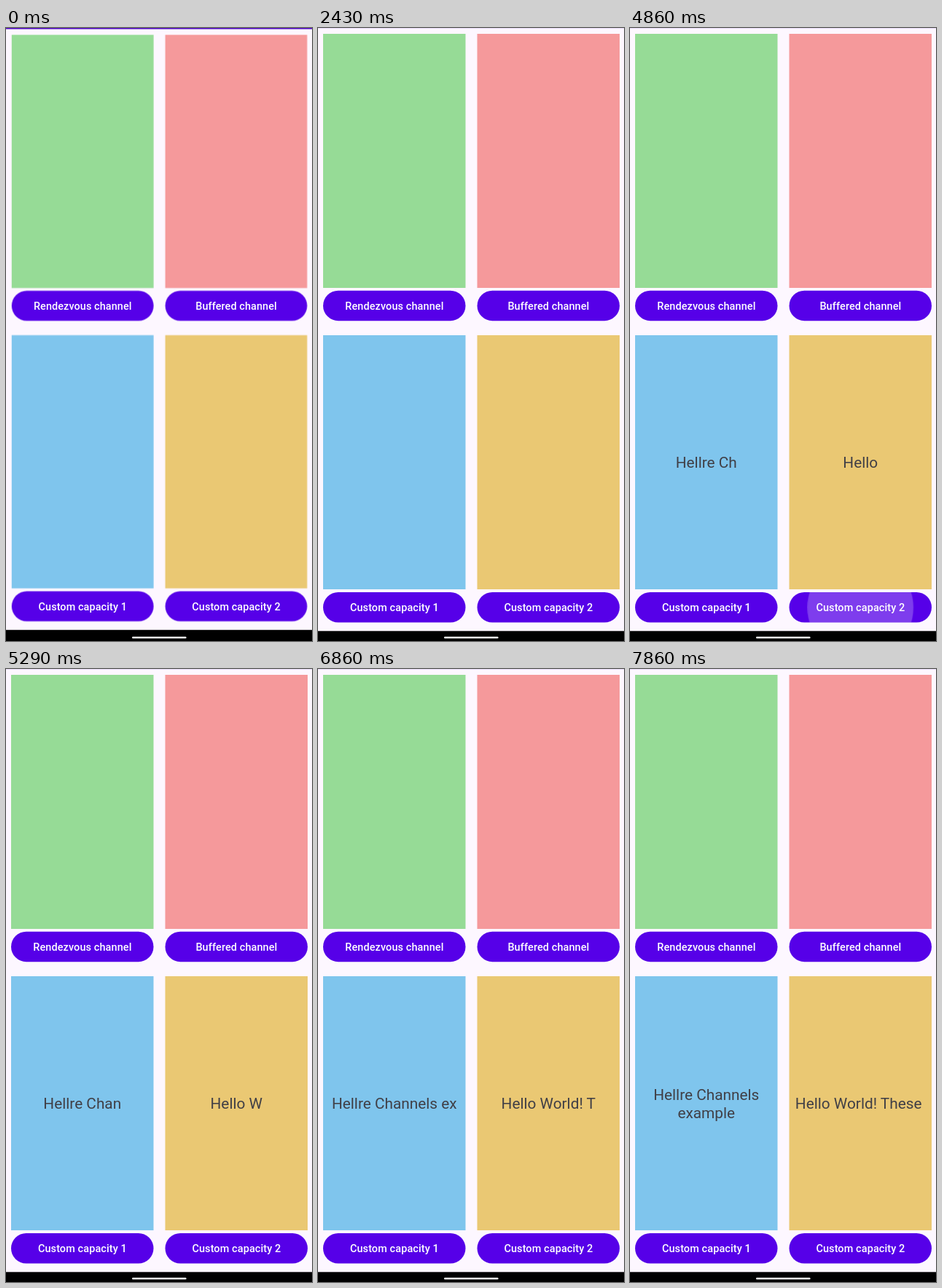
Write an HTML page that moves like this. It is 420x842 px and loops after 8000 ms.

```html
<!DOCTYPE html>
<html lang="en">
<head>
<meta charset="utf-8">
<title>Channels</title>
<style>
  html, body { margin: 0; width: 100%; height: 100%; overflow: hidden; background: #fdf7ff; }
  body { position: relative; }
  svg { position: absolute; left: 0; top: 0; display: block; }
  .label {
    font: 500 14.46px Roboto, sans-serif;
    letter-spacing: .1px;
    fill: #fff;
    text-anchor: middle;
  }
  .button { fill: #5600e8; }
  .screen { transform-origin: 210px 390px; animation: settle 8s linear infinite; }
  .ripple {
    fill: #fff;
    opacity: 0;
    transform-box: fill-box;
    transform-origin: center;
    animation: ripple 8s linear infinite;
  }
  .late { animation-delay: .86s; }
  .message {
    position: absolute;
    top: 422px;
    width: 195px;
    height: 351px;
    display: flex;
    align-items: center;
    justify-content: center;
    text-align: center;
    white-space: pre-wrap;
    font: 400 20.8px/24.8px Roboto, sans-serif;
    color: #403f46;
  }
  @keyframes settle {
    0%, 1.7% { transform: scale(.9965); }
    6.5%, 100% { transform: none; }
  }
  @keyframes ripple {
    0%, 48.1% { opacity: 0; transform: scale(.2); }
    48.9% { opacity: .24; }
    51% { transform: scale(1); }
    51.9% { opacity: .24; }
    54.4%, 100% { opacity: 0; transform: scale(1); }
  }
</style>
</head>
<body>
<svg width="420" height="842" viewBox="0 0 420 842">
  <defs>
    <clipPath id="left"><rect x="7" y="775" width="195.5" height="41.5" rx="20.75"/></clipPath>
    <clipPath id="right"><rect x="218.5" y="775" width="195.5" height="41.5" rx="20.75"/></clipPath>
  </defs>
  <g class="screen">
    <rect x="-5" y="-5" width="430" height="5.1" fill="#4a00c0"/>
    <rect x="7" y="8" width="195.5" height="349" fill="#96db96"/>
    <rect x="218.5" y="8" width="195.5" height="349" fill="#f5999b"/>
    <rect x="7" y="422" width="195.5" height="349" fill="#7fc5ed"/>
    <rect x="218.5" y="422" width="195.5" height="349" fill="#eac873"/>

    <g class="button">
      <rect x="7" y="360.7" width="195.5" height="41.5" rx="20.75"/>
      <rect x="218.5" y="360.7" width="195.5" height="41.5" rx="20.75"/>
      <rect x="7" y="775" width="195.5" height="41.5" rx="20.75"/>
      <rect x="218.5" y="775" width="195.5" height="41.5" rx="20.75"/>
    </g>
    <g clip-path="url(#left)"><circle class="ripple" cx="104.75" cy="796" r="100"/></g>
    <g clip-path="url(#right)"><circle class="ripple late" cx="316.25" cy="796" r="100"/></g>

    <g class="label">
      <text x="104.9" y="386.5">Rendezvous channel</text>
      <text x="316.4" y="386.5">Buffered channel</text>
      <text x="104.9" y="801">Custom capacity 1</text>
      <text x="316.4" y="801">Custom capacity 2</text>
    </g>
    <rect x="-5" y="828.3" width="430" height="30" fill="#000"/>
  </g>
  <rect x="173" y="836" width="74.5" height="2.6" rx="1.3" fill="#eee"/>
</svg>
<div class="message" style="left:7.25px"><span id="one"></span></div>
<div class="message" style="left:218.75px"><span id="two"></span></div>
<script>
  const LOOP = 8000, STEP = 212, BURST = 5;
  const feeds = [
    { el: document.getElementById('one'), text: 'Hellre Channels example', start: 3990 },
    { el: document.getElementById('two'), text: 'Hello World! These are Channels example', start: 4858 }
  ];

  // The first letters arrive together, the rest one per step.
  function received({ text, start }, t) {
    if (t < start) return '';
    const count = BURST + Math.floor((t - start) / STEP);
    // A trailing space still counts toward the centred width.
    return text.slice(0, count).replace(/ $/, '\u00a0');
  }

  let origin;
  function draw(now) {
    origin ??= now;
    const t = (now - origin) % LOOP;
    for (const feed of feeds) {
      const shown = received(feed, t);
      if (feed.el.textContent !== shown) feed.el.textContent = shown;
    }
    requestAnimationFrame(draw);
  }
  requestAnimationFrame(draw);
</script>
</body>
</html>
```
